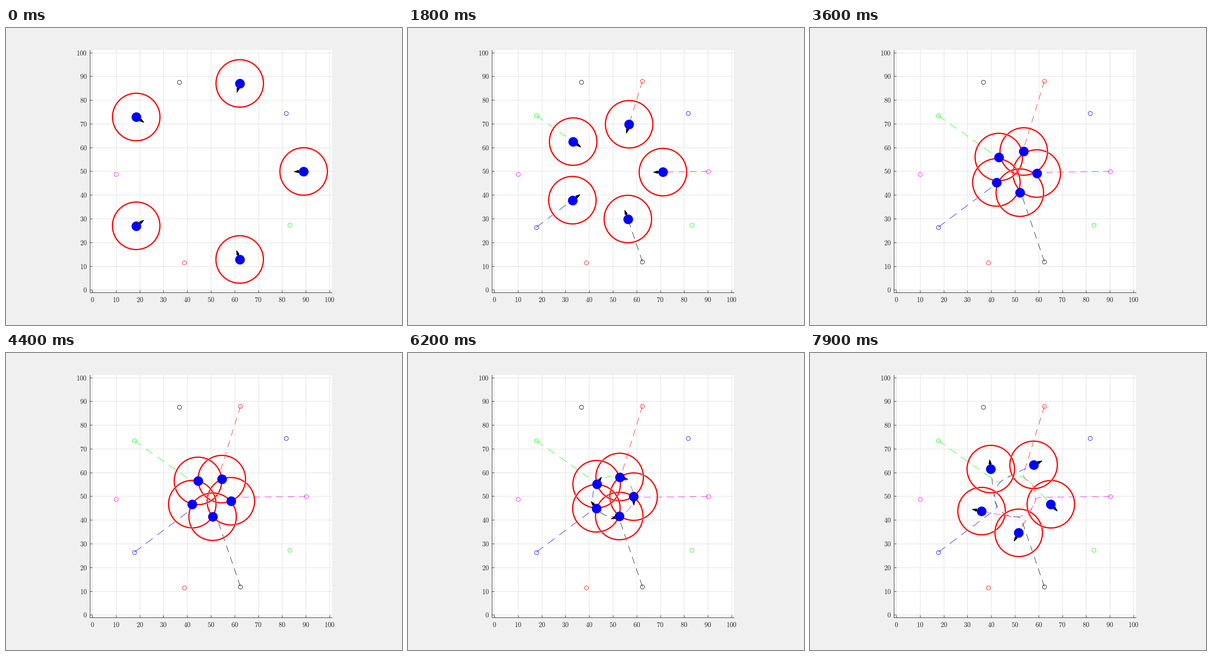
Recreate the animation shown at these times as a matplotlib script. Size 864 by 648 pixels, loop 8 s.

```python
import numpy as np
import matplotlib.pyplot as plt
from matplotlib.animation import FuncAnimation
from matplotlib.patches import Circle, Polygon

plt.rcParams["mathtext.fontset"] = "cm"

FRAMES = 80
W, H, SIDE = 864, 648, 528.12
PX = SIDE / 102               # pixels per data unit
MID_X, MID_Y = 447.49, 335.06  # centre of the plot, from the lower left
CENTRE = 50 + 50j
GOAL = 40 * np.exp(-1j * np.radians(178.3))
COLORS = ["magenta", "red", "lime", "blue", "black"]
TURNS = np.exp(2j * np.pi * np.arange(5) / 5)


def make_path():
    """Route of the agent starting at angle 0, relative to the centre."""
    head = (GOAL - 40) / abs(GOAL - 40)
    enter = 40 + 29.6 * head
    ang = np.radians(np.linspace(16, 101, 300))
    u = np.linspace(0, 1, 300)
    ring = (8.55 + 0.2 * u**2) * np.exp(-1j * ang)
    t = np.linspace(0, 1, 80)
    corner = 8.78 - 0.47j
    bend = (1 - t)**2 * enter + 2 * t * (1 - t) * corner + t**2 * ring[0]
    pts = np.concatenate([[40], bend, ring[1:], [GOAL]])
    dist = np.concatenate([[0], np.cumsum(abs(np.diff(pts)))])
    s = np.arange(0, dist[-1], 0.05)
    return s, np.interp(s, dist, pts.real) + 1j * np.interp(s, dist, pts.imag)


def speed(i):
    """Cruise, brake near the others, then pick up along the ring."""
    if i <= 25:
        return 1.0
    if i <= 36:
        return np.exp(-((i - 25) / 6.42)**1.3)
    if i <= 52:
        return 0.13 * 1.07**(i - 36)
    return min(1.0, 0.384 * 1.09**(i - 52))


S, PATH = make_path()
SPEED = np.array([speed(i) for i in range(FRAMES)])
TRAVEL = np.cumsum(SPEED)


def at(s):
    return np.interp(s, S, PATH.real) + 1j * np.interp(s, S, PATH.imag)


def dashed(pts):
    """Stipple along the major axis: 15 px on, 10 px off."""
    d = np.diff(pts) * PX
    run = np.concatenate([[0], np.cumsum(np.maximum(abs(d.real), abs(d.imag)))])
    return np.where(run % 25 < 15, pts, np.nan + 1j * np.nan)


def xy(z):
    z = np.atleast_1d(z)
    return np.column_stack([z.real, z.imag])


def add_axes(dx=0, dy=0):
    """Square axes around the centre, moved by a part of a pixel."""
    left, bottom = MID_X + dx - SIDE / 2, MID_Y + dy - SIDE / 2
    axes = fig.add_axes([left / W, bottom / H, SIDE / W, SIDE / H])
    axes.set(xlim=(-1, 101), ylim=(-1, 101))
    return axes


fig = plt.figure(figsize=(W / 72, H / 72), dpi=72, facecolor="#f0f0f0")

# Half a pixel makes the grid snap to the pixel that holds each line.
frame = add_axes(-0.5, 0.5)
ticks = range(0, 101, 10)
labels = [f"${n}$" for n in ticks]
frame.set_xticks(ticks, labels)
frame.set_yticks(ticks, labels)
frame.tick_params(direction="in", length=5, width=1, color="#262626",
                  labelcolor="#262626", labelsize=14.67)
frame.tick_params(axis="x", pad=9)
frame.tick_params(axis="y", pad=6)
frame.set_axisbelow(True)
frame.grid(color="#dfdfdf", lw=1)
for side, spine in frame.spines.items():
    spine.set(visible=side in ("left", "bottom"), color="#262626", lw=1)

ax = add_axes()
ax.axis("off")


class Agent:
    def __init__(self, turn, color, order):
        self.turn = turn
        self.trail_pts = dashed(CENTRE + PATH * turn)
        for spot in (40, GOAL):
            z = CENTRE + spot * turn
            ax.plot(z.real, z.imag, "o", ms=9, mfc="none", mec=color,
                    mew=0.9, zorder=2.5)
        self.trail, = ax.plot([], [], color=color, lw=0.85, zorder=2.6,
                              solid_capstyle="butt")
        z = 3 + order / 10
        self.rings = [Circle((0, 0), 10, fill=False, ec=c, lw=w, zorder=z + dz)
                      for c, w, dz in (("white", 4, 0), ("red", 2.7, 0.05))]
        self.head = Polygon(np.zeros((3, 2)), fc="black", ec="black", lw=1.5,
                            joinstyle="round", zorder=4)
        for patch in (*self.rings, self.head):
            ax.add_patch(patch)
        self.shaft, = ax.plot([], [], color="black", lw=2.7, zorder=4)
        self.disc, = ax.plot([], [], "o", ms=21, color="blue", mew=0,
                             zorder=5, snap=False)

    def move(self, i):
        s, v = TRAVEL[i], SPEED[i]
        pos = CENTRE + at(s) * self.turn
        way = (at(s) - at(s - 0.3)) * self.turn
        way *= v / abs(way)
        seen = self.trail_pts[S <= s]
        self.trail.set_data(seen.real, seen.imag)
        for ring in self.rings:
            ring.center = (pos.real, pos.imag)
        self.disc.set_data([pos.real], [pos.imag])
        self.shaft.set_data(*xy(pos + way * np.array([0, 2.6])).T)
        self.head.set_xy(xy(pos + way * np.array([3.9, 2.2 + 0.5j, 2.2 - 0.5j])))


agents = [Agent(t, c, k) for k, (t, c) in enumerate(zip(TURNS, COLORS))]


def update(i):
    for agent in agents:
        agent.move(i)
    return []


anim = FuncAnimation(fig, update, frames=FRAMES, interval=100,
                     init_func=lambda: update(0), repeat=True, repeat_delay=0)
plt.show()
```
